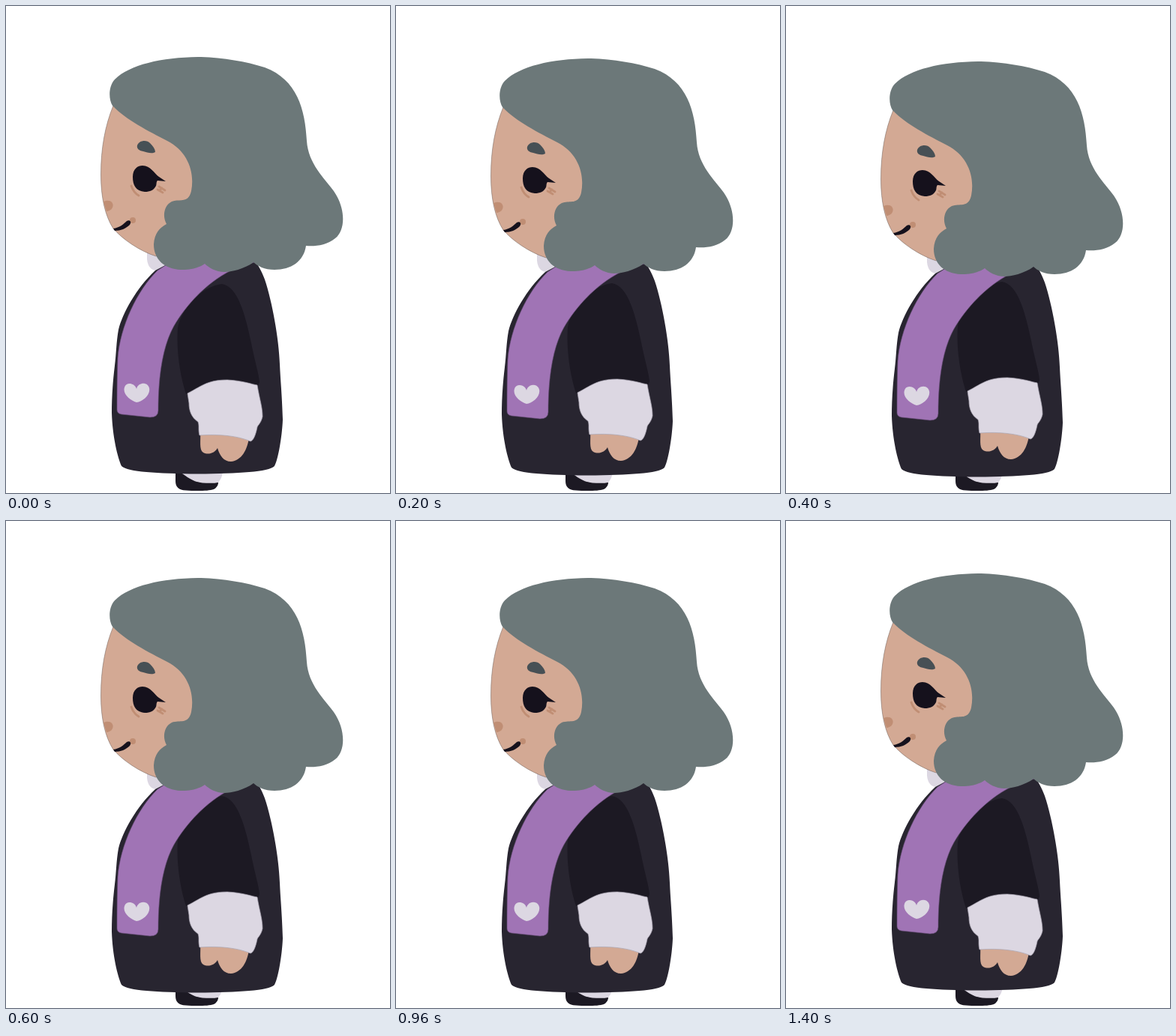
These frames come from a looping animation (512x650 px, 1.6 s). An HTML page:

```html
<!DOCTYPE html>
<html lang="en">
<head>
<meta charset="utf-8">
<title>Idle breathing</title>
<style>
  html, body { margin: 0; width: 100%; height: 100%; overflow: hidden; background: #fff; }
  svg { display: block; width: 100%; height: 100%; }
</style>
</head>
<body>
<svg viewBox="0 0 512 650" xmlns="http://www.w3.org/2000/svg">
  <g id="foot">
    <path fill="#1c1923" d="M226 622 V634 C226 642 230 646 240 646.500 C252 647.500 270 647.500 277 645 C281 643 283 639 283 636 L270 622 Z"/>
    <path fill="#dcd7e2" d="M232 622 C239 626 247 635 262 636.500 C270 637 279 637 283 636 C286 632 288 629 289 622 Z"/>
  </g>

  <g class="body">
    <path fill="#dcd7e2" d="M188 325 V338 C189 348 194 353 201 353 C207 352 212 346 215 342 V325 Z"/>
    <path fill="#282530" d="M199 353 C174 376 155 411 150 432 C147 448 147 465 145 480 C142 505 141 525 141 543 C142 575 149 603 154 614 C163 622 200 624 256 624.500 C310 624 350 622 358 614 C363 605 368 575 369 552 C368 520 366 500 365 478 C364 445 355 395 345 365 C341 354 336 345 332 341 L216 344 Z"/>
  </g>

  <g class="arm">
    <path fill="#1c1923" d="M240 518 C231 490 227 455 229 430 C232 408 257 375 288 371 C309 374 319 412 327 450 C332 475 338 495 338 502 L335 510 Z"/>
    <path fill="#d3a994" d="M259 568 C260 580 257 592 263 596 C270 600 279 596 282 590 C285 600 290 608 300 608 C314 607 322 592 324 576 Z"/>
    <path fill="#dcd7e2" stroke="#aaa5b2" stroke-width=".7" d="M242 517 C260 508 268 499 295 499 C316 500 328 505 335 506 C338 525 342 535 342 548 C340 557 336 559 335 562 C333 572 330 580 326 581 C310 574 285 571 258 573 C256 565 258 560 256 555 C247 549 244 540 244 530 Z"/>
  </g>

  <g class="body">
    <path fill="#a074b5" stroke="#60486f" stroke-width=".6" d="M202 353 C175 379 152 428 149 470 C148 495 148 520 148 539 Q148 544 154 545 L192 549 Q203 549 203 540 C203 490 210 452 224 427 C239 401 266 370 300 353 L331 342 L216 344 Z"/>
    <path fill="#dcd7e2" d="M174 511 C176 502 189 501 191 510 C193 519 182 528 174 529 C166 527 155 518 158 509 C160 501 172 503 174 511 Z"/>
  </g>

  <g class="head">
    <path fill="#d3a994" stroke="#6b5a55" stroke-width=".5" d="M143 133 C132 160 126.500 190 126.500 225 C126.500 255 132 280 143 297 C155 311 178 327 200 334 L260 290 V170 Z"/>
    <path fill="#6c7879" d="M142 133 C137 125 136 108 145 98 C165 78 210 68 260 68 C290 69 320 74 345 82 C388 98 399 138 401 180 C403 211 425 230 437 247 C453 270 453 299 439 310 C427 320 411 321 400 320 C397 341 380 352 358 352 C345 352 335 347 330 342 C318 351 300 355 291 355 C280 355 270 349 265 344 C255 351 243 352 233 352 C211 351 197 338 197 318 C198 303 205 296 214 291 C208 280 211 266 221 261 C232 257 243 264 247 247 C252 221 242 194 215 180 C190 167 160 152 142 133 Z"/>
    <path fill="#475055" d="M175 186 C177 179 188 178 192 183 C196 187 199 191 199 195 C194 198 188 195 183 194 C177 193 174 190 175 186 Z"/>
    <path fill="none" stroke="#c08e74" stroke-width="2.800" stroke-linecap="round" d="M167 240 Q170 249 177 253 M204 241 L212 246 M202 245 L209 249 M208 243 L205 246"/>
    <path fill="#15111c" d="M169 228 C169 217 176 213 182 213 C193 213 197 223 204 228 L213 234 L202 233 C200 235 201 238 200 240 C197 246 192 248 185 248 C173 247 169 239 169 228 Z"/>
    <path fill="#c08e74" d="M130 261 C145 255 147 273 134 274 Z"/>
    <circle fill="#c08e74" cx="169" cy="286" r="4"/>
    <path fill="#15111c" d="M143 297 C151 296 157 291 161 287 C165 285 168 288 165 292 C160 297 153 300 145 300 Z"/>
  </g>
</svg>
<script>
  const STEP = 200;
  const CYCLE = [0, 1, 2, 3, 3, 3, 2, 1];

  // Vertical offset of each part, from breathed in to breathed out.
  const OFFSETS = {
    head: [0, 2, 6, 8],
    body: [0, 2, 4, 5],
    arm: [0, -1, -3, -4],
  };

  function render(time) {
    const pose = CYCLE[Math.floor(time / STEP) % CYCLE.length];
    for (const [part, offsets] of Object.entries(OFFSETS)) {
      for (const group of document.querySelectorAll(`.${part}`)) {
        group.setAttribute("transform", `translate(0 ${offsets[pose]})`);
      }
    }
  }

  const start = performance.now();
  function tick() {
    render(performance.now() - start);
    requestAnimationFrame(tick);
  }
  tick();
</script>
</body>
</html>
```
